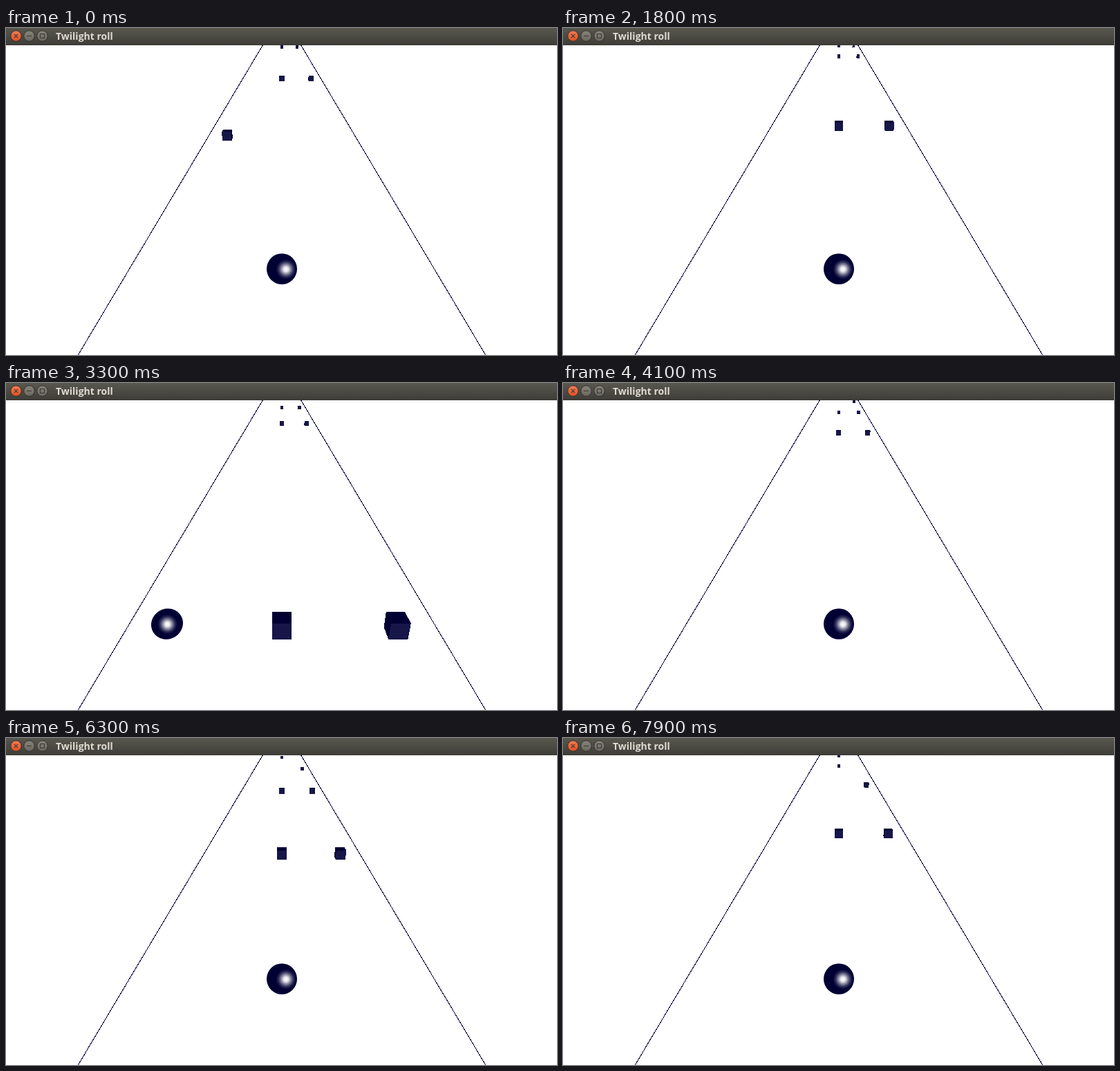
Write an HTML page that moves like this. It is 797x473 px and loops after 8 s.

```html
<!DOCTYPE html>
<html lang="en">
<head>
<meta charset="utf-8">
<title>Twilight roll</title>
<style>
  html, body { margin: 0; width: 100%; height: 100%; overflow: hidden; background: #fff; }
  svg { display: block; width: 797px; height: 473px; }
  .road { stroke: #000033; stroke-width: 1; shape-rendering: crispEdges; }
  .cube path { shape-rendering: crispEdges; }
  .dark { fill: #000033; }
  .front { fill: #161648; }
  .title { font: 700 14px "Open Sans", "Noto Sans", sans-serif; fill: #dfdbd2; }
  .button { stroke: #33322e; stroke-width: 1; }
  .icon { fill: none; stroke: #3a3934; stroke-width: 1.1; }
</style>
</head>
<body>
<svg viewBox="0 0 797 473">
  <defs>
    <linearGradient id="bar" x2="0" y2="1">
      <stop offset="0" stop-color="#59584f"/>
      <stop offset="1" stop-color="#3d3c37"/>
    </linearGradient>
    <linearGradient id="orange" x2="0" y2="1">
      <stop offset="0" stop-color="#f47c55"/>
      <stop offset="1" stop-color="#e0501f"/>
    </linearGradient>
    <linearGradient id="grey" x2="0" y2="1">
      <stop offset="0" stop-color="#86847a"/>
      <stop offset="1" stop-color="#69675f"/>
    </linearGradient>
    <radialGradient id="shine">
      <stop offset="0" stop-color="#fff"/>
      <stop offset=".22" stop-color="#fff" stop-opacity=".92"/>
      <stop offset=".5" stop-color="#fff" stop-opacity=".5"/>
      <stop offset=".75" stop-color="#fff" stop-opacity=".17"/>
      <stop offset="1" stop-color="#fff" stop-opacity="0"/>
    </radialGradient>
  </defs>

  <path class="road" d="M371.3 25L104.3 473M426.7 25L693.7 473"/>
  <ellipse id="ball" class="dark"/>
  <circle id="glint" cy="349" r="14.5" fill="url(#shine)"/>
  <g id="cubes"></g>

  <rect width="797" height="25" fill="url(#bar)"/>
  <circle class="button" cx="14.5" cy="11.5" r="7.7" fill="url(#orange)"/>
  <circle class="button" cx="33.5" cy="11.5" r="7.7" fill="url(#grey)"/>
  <circle class="button" cx="52.5" cy="11.5" r="7.7" fill="url(#grey)"/>
  <path class="icon" d="M11.8 8.8l5.4 5.4m0-5.4l-5.4 5.4M30 11.5h7M49.5 8.5h6v6h-6z"/>
  <text class="title" x="72" y="17">Twilight roll</text>
</svg>

<script>
const LOOP = 8000, STEP = 100;

// Pinhole camera, 6 units above the road, looking down with slope 1/2
const CX = 399, CY = 249, FOCAL = 541, HEIGHT = 6;
const COS = 2 / Math.sqrt(5), SIN = 1 / Math.sqrt(5);
const LANE = 3, HALF = 0.25;
const BALL_Y = 348.5, BALL_R = 22, LANE_PX = 166;

// [lane, distance ahead at the start]
const layout = [
  [0, 160], [0, 140], [1, 120], [0, 100], [1, 100],
  [0, 80], [1, 80], [0, 40], [1, 40], [-1, 20]
];

// [time, distance travelled]
const travel = [
  [0, 0], [800, 8.1], [1800, 18.1], [2400, 23.55], [2600, 23.55], [2700, 26.1],
  [3300, 32.1], [3500, 33.5], [3600, 34.5], [5400, 52.5], [8000, 78.55]
];

// [time, lane of the ball]
const steering = [
  [0, 0], [800, 0], [950, 1], [1400, 1], [1550, 0], [2100, 0], [2250, -1],
  [3450, -1], [3600, 0], [6600, 0], [6750, -1], [7450, -1], [7600, 0], [8000, 0]
];

function valueAt(keys, t) {
  const i = keys.findIndex(k => k[0] > t);
  const [t0, v0] = keys[i - 1], [t1, v1] = keys[i];
  return v0 + (v1 - v0) * (t - t0) / (t1 - t0);
}

function project(x, y, z) {
  const drop = HEIGHT - y;
  const scale = FOCAL / (z * COS + drop * SIN);
  return [CX + x * scale, CY + (drop * COS - z * SIN) * scale];
}

function face(points) {
  return "M" + points.map(p => project(...p).map(n => n.toFixed(2)).join(" ")).join("L") + "Z";
}

const ball = document.getElementById("ball");
const glint = document.getElementById("glint");
const group = document.getElementById("cubes");

function addNode(name, parent, className) {
  const node = document.createElementNS("http://www.w3.org/2000/svg", name);
  node.setAttribute("class", className);
  return parent.appendChild(node);
}

const cubes = layout.map(([lane, start]) => {
  const node = addNode("g", group, "cube");
  return { lane, start, node, dark: addNode("path", node, "dark"), front: addNode("path", node, "front") };
});

function drawCube({ lane, start, node, dark, front }, distance) {
  const z = start - distance;
  node.style.display = z > 3.5 ? "" : "none";
  if (z <= 3.5) return;
  const x = lane * LANE;
  const l = x - HALF, r = x + HALF, b = -HALF, t = HALF, near = z - HALF, far = z + HALF;
  let d = face([[l, t, near], [r, t, near], [r, t, far], [l, t, far]]);
  if (lane) {
    const inner = x - lane * HALF;
    d += face([[inner, t, near], [inner, t, far], [inner, b, far], [inner, b, near]]);
  }
  dark.setAttribute("d", d);
  dark.setAttribute("fill-rule", "nonzero");
  front.setAttribute("d", face([[l, t, near], [r, t, near], [r, b, near], [l, b, near]]));
}

function drawBall(lane) {
  const dx = lane * LANE_PX, dy = BALL_Y - CY;
  const angle = Math.atan2(dy, dx) * 180 / Math.PI;
  ball.setAttribute("rx", BALL_R * Math.hypot(1, Math.hypot(dx, dy) / FOCAL));
  ball.setAttribute("ry", BALL_R);
  ball.setAttribute("transform", `translate(${CX + dx} ${BALL_Y}) rotate(${angle})`);
  glint.setAttribute("cx", CX + dx + 6 + 5.5 * lane);
}

function draw(now) {
  const t = Math.floor(now % LOOP / STEP) * STEP;
  const distance = valueAt(travel, t);
  cubes.forEach(cube => drawCube(cube, distance));
  drawBall(valueAt(steering, t));
}

let origin;
function tick(now) {
  origin ??= now;
  draw(now - origin);
  requestAnimationFrame(tick);
}
draw(0);
requestAnimationFrame(tick);
</script>
</body>
</html>
```
